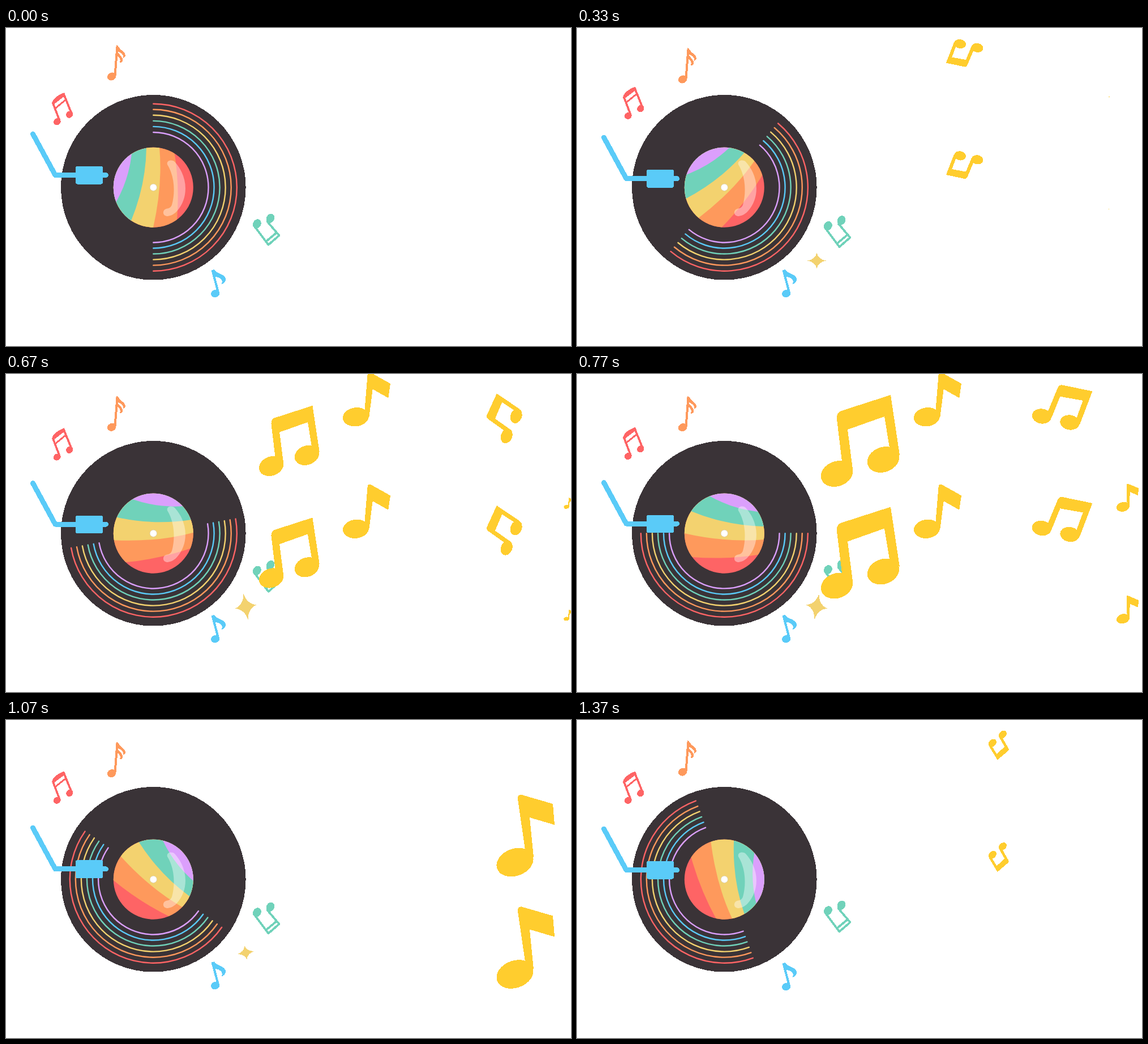
An HTML page for the animation above (1410 ms loop, 998 px wide and 561 px high).

```html
<!DOCTYPE html>
<html lang="en">
<head>
<meta charset="utf-8">
<title>Spinning record</title>
<style>
  :root {
    --red: #fe6465; --orange: #fe995c; --yellow: #f3d26f;
    --teal: #70d2ba; --blue: #5acbf8; --purple: #db9ffc;
    --dark: #3a3337; --gold: #ffcd2e;
  }
  html, body { margin: 0; width: 100%; height: 100%; overflow: hidden; background: #fff; }
  svg { display: block; width: 100%; height: 100%; }
  .line { fill: none; stroke-linecap: round; stroke-linejoin: round; }
  .crisp, .crisp * { shape-rendering: crispEdges; }
  #grooves { fill: none; stroke-width: 2.4; stroke-linecap: round; }
  #orange { fill: var(--orange); stroke: var(--orange); }
  #red { fill: var(--red); stroke: var(--red); }
  #green { fill: var(--teal); stroke: var(--teal); }
  #blue, #arm { fill: var(--blue); stroke: var(--blue); }
  .crisp > :not(.line) { stroke: none; }
  #flying { fill: var(--gold); }
</style>
</head>
<body>
<svg viewBox="0 0 998 561">
  <defs>
    <clipPath id="label"><circle cx="260.3" cy="281.2" r="70.5"/></clipPath>
    <g id="pair" class="crisp">
      <path d="M-41-38Q-42-50-33-53L54-81L70 25L52 12L43-43L-22-20L-13 50L-32 36Z"/>
      <ellipse rx="29" ry="22" transform="translate(-41 58) rotate(-20)"/>
      <ellipse rx="29" ry="22" transform="translate(41 33) rotate(-20)"/>
    </g>
    <g id="single" class="crisp">
      <path d="M-13-64Q-14-73-6-72L49-56L52-19L8-32L15 38L0 25Z"/>
      <ellipse rx="33.5" ry="24" transform="translate(-18 47) rotate(-20)"/>
    </g>
  </defs>

  <circle class="crisp" cx="260.3" cy="281.2" r="163.3" fill="var(--dark)"/>
  <g id="grooves"></g>
  <g clip-path="url(#label)">
    <circle cx="260" cy="281" r="72" fill="var(--red)"/>
    <g id="bands"></g>
  </g>
  <path fill="#fff" opacity=".4" d="M285 241C283 234 292 231 298 236C322 262 323 300 302 323C296 330 288 332 284 332C276 331 276 321 283 319C288 318 291 317 293 312C299 290 298 262 285 241Z"/>
  <circle cx="260.3" cy="281.2" r="6.2" fill="#fff" stroke="#d8c9a0" stroke-width=".8"/>

  <g id="arm" class="crisp">
    <path class="line" stroke-width="9" d="M47.5 187L87 259.5H176.5"/>
    <rect x="123" y="244" width="48" height="31.5" rx="3"/>
  </g>
  <g id="orange" class="crisp">
    <path class="line" stroke-width="4" d="M196.5 33L192.5 84"/>
    <ellipse rx="8" ry="6.8" transform="translate(186.7 85.5) rotate(-25)"/>
    <path d="M195 30L199 33C200 38 211 42 211 48C211 51 209 52 207 53C208 47 204 44 197 41Z"/>
    <path d="M197 43C202 48 207 52 206 58C205 61 203 61 201 61C203 55 201 52 196 49Z"/>
  </g>
  <g id="red" class="crisp">
    <path class="line" stroke-width="3.7" d="M83.5 134L94.5 163M102.5 118L115.5 150"/>
    <path d="M81 134Q82 122 103 114L105 119L84 135Z"/>
    <path class="line" stroke-width="3" d="M87.5 141.3L106 126.3"/>
    <ellipse rx="6.6" ry="5.8" transform="translate(90.3 165.3) rotate(-30)"/>
    <ellipse rx="6.6" ry="5.8" transform="translate(112.3 152.5) rotate(-50)"/>
  </g>
  <g id="green" class="crisp">
    <path class="line" stroke-width="3.8" d="M439 350L463.5 382.5L482.5 366L462 342M460 376L478 361"/>
    <ellipse rx="8.5" ry="7" transform="translate(443.3 345.5) rotate(-60)"/>
    <ellipse rx="8.5" ry="7" transform="translate(467 335.8) rotate(-60)"/>
  </g>
  <g id="blue" class="crisp">
    <path class="line" stroke-width="4" d="M365 429L375 467"/>
    <ellipse rx="7.8" ry="6.6" transform="translate(369.7 468.3) rotate(-20)"/>
    <path d="M363 427L368 426C371 434 389 433 388 445C387 449 384 451 381 452C384 445 380 440 368 438Z"/>
  </g>
  <path id="star" class="crisp" fill="var(--yellow)" d="M0-.84Q.16-.16 1 0Q.16.16 0 .84Q-.16.16-1 0Q-.16-.16 0-.84Z"/>
  <g id="flying">
    <g id="row"></g>
    <use href="#row" y="197.5"/>
  </g>
</svg>

<script>
const LOOP = 1410, CYCLE = 33.5, LANDED = .78;
const { sin, cos, exp, min, max, floor, PI } = Math;
const $ = id => document.getElementById(id);
const mix = (a, b, t) => a + (b - a) * t;
const wave = (beat, period) => sin(2 * PI * beat / period);
const move = (el, value) => el.setAttribute('transform', value);

function add(parent, tag, attrs) {
  const el = document.createElementNS('http://www.w3.org/2000/svg', tag);
  for (const name in attrs) el.setAttribute(name, attrs[name]);
  return parent.appendChild(el);
}

['red', 'orange', 'yellow', 'teal', 'blue', 'purple'].forEach((color, i) => {
  const r = 147.5 - 10.05 * i;
  add($('grooves'), 'path', {
    d: `M260.3 ${281.2 - r}a${r} ${r} 0 0 1 0 ${2 * r}`, stroke: `var(--${color})`
  });
});

// Each band fills everything left of its curved right edge.
const bands = {
  orange: 'M297 216Q307 277 302 339',
  yellow: 'M271 211Q277 277 260 352',
  teal: 'M248 211Q247 277 221 340',
  purple: 'M222 222Q217 267 195 306'
};
for (const color in bands) {
  add($('bands'), 'path', { d: bands[color] + 'V400H150V150H300Z', fill: `var(--${color})` });
}

// Vertical sway of each part.
const sway = {
  arm: b => 4.6 * (1 - exp(-b / 20) * cos(2 * PI * b / 24)),
  red: b => -24 * wave(b, 112),
  orange: b => 8.9 * wave(b, 84),
  green: b => 5 * wave(b, 42) - .13 * b,
  blue: b => b / 16 * cos(2 * PI * b / 32)
};

// A note spins along an arch from one point to another while it grows;
// `drift` shifts it in proportion to its size.
const notes = [
  { shape: 'pair', start: 0, flight: 22, end: 25, from: [940, 115], to: [500, 118],
    arch: 73, drift: [0, 0], size: 1, angle: 0, spin: 360 },
  { shape: 'single', start: 10.1, flight: 8.4, end: 25, from: [941, 122], to: [696, 47],
    arch: 62, drift: [-85, 0], size: .69, angle: 13, spin: 540 },
  { shape: 'pair', start: 9.8, flight: 17, end: 29, from: [941, 122], to: [805, 62],
    arch: -9, drift: [90, -10], size: .95, angle: 31, spin: 340 },
  { shape: 'single', start: 18, flight: 11.5, end: 34, from: [1008, 235], to: [990, 209],
    arch: 0, drift: [-73, -5], size: 1, angle: 0, spin: -15 }
];
for (const note of notes) note.el = add($('row'), 'use', { href: '#' + note.shape });

function fly(note, phase) {
  const { el, from, to, drift } = note;
  const shown = phase > note.start && phase < note.end;
  el.setAttribute('visibility', shown ? 'visible' : 'hidden');
  if (!shown) return;
  const u = min(1, (phase - note.start) / note.flight);
  const t = min(1, u / LANDED);
  const scale = note.size * u * (.8 + .2 * u ** 16);
  const x = mix(from[0], to[0], t) + drift[0] * scale;
  const y = mix(from[1], to[1], t) + drift[1] * scale - 4 * note.arch * t * (1 - t);
  move(el, `translate(${x} ${y}) rotate(${note.angle - note.spin * (1 - t)}) scale(${scale})`);
}

function draw(time) {
  // The scene runs at 30 steps a second, the record at 24 beats.
  const step = min(41, floor(floor(time % LOOP / 10) * .3 + .101));
  const beat = floor(step * .8 + .001);

  const turn = `rotate(${beat * 5} 260.3 281.2)`;
  move($('grooves'), turn);
  move($('bands'), turn);
  for (const id in sway) move($(id), `translate(0 ${sway[id](beat)})`);

  const size = max(0, 23 * wave(beat, 64));
  move($('star'), `translate(423.5 410.5) rotate(${(beat - 8) * 10}) scale(${size.toFixed(3)})`);

  const phase = step > CYCLE ? step - CYCLE : step;
  for (const note of notes) fly(note, phase);
}

const begin = performance.now();
function tick() {
  draw(performance.now() - begin);
  requestAnimationFrame(tick);
}
tick();
</script>
</body>
</html>
```
